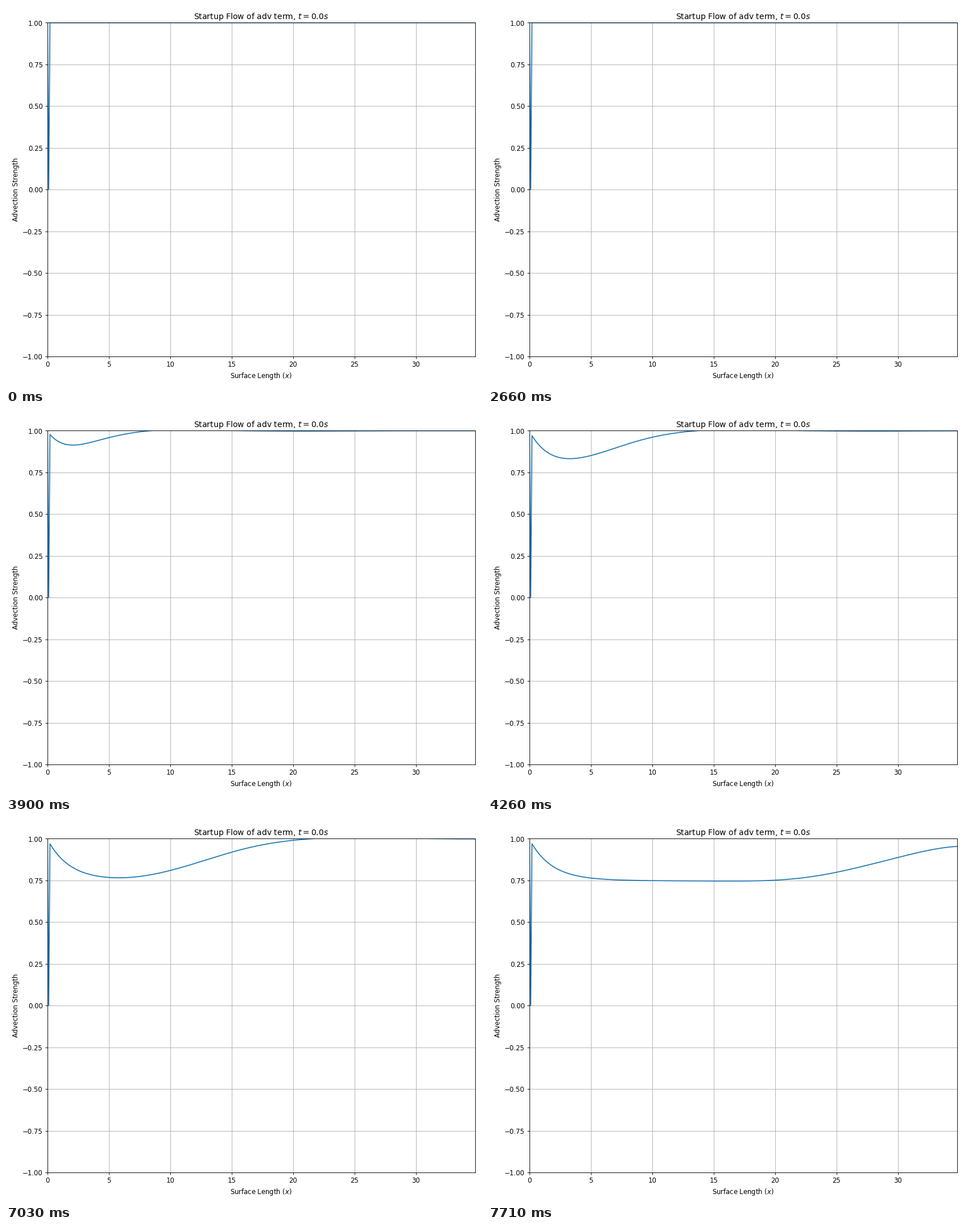
These frames come from a looping animation (837 by 669 pixels, 8000 ms). A matplotlib script:

```python
import math

import numpy as np
import matplotlib.pyplot as plt
from matplotlib.animation import FuncAnimation

DPI = 83.7
W, H = 837, 669
LEFT, RIGHT, TOP, BOTTOM = 73.0, 824.5, 29.5, 617.0
LOOP, TICK = 8000, 20
STEP = 40
LENGTH = 34.8

x = np.linspace(0, LENGTH, 349)
erf = np.vectorize(math.erf)

# Front position, its speed and its width at a few solver steps
KEYS = [0, 21, 32, 49, 58, 67]
POS = [-6.5, -1.2, 2.05, 12.0, 21.8, 29.1]
SPEED = [0.2, 0.25, 0.4, 0.9, 1.0, 0.75]
WIDTH = [1.8, 2.5, 3.2, 4.25, 5.15, 5.4]


def front(n):
    """Cubic Hermite path of the front centre."""
    i = min(np.searchsorted(KEYS, n, side="right") - 1, len(KEYS) - 2)
    h = KEYS[i + 1] - KEYS[i]
    s = (n - KEYS[i]) / h
    return ((1 + 2 * s) * (1 - s) ** 2 * POS[i]
            + s * (1 - s) ** 2 * h * SPEED[i]
            + s * s * (3 - 2 * s) * POS[i + 1]
            + s * s * (s - 1) * h * SPEED[i + 1])


def bump(z, centre, width):
    return np.exp(-((z - centre) / width) ** 2)


def profile(n):
    y = np.ones_like(x)
    if n > 0:
        deficit = 0.2488 + 0.0003 * x - 0.2188 * np.exp(-(x - 0.2) / 1.78)
        near_wall = x - 0.8 * np.exp(x - LENGTH)
        z = (near_wall - front(n)) / np.interp(n, KEYS, WIDTH)
        z = np.where(z < 0, z * (1 + 0.055 * z * z), z)
        ripple = 0.008 * bump(z, 5.8, 1.2) - 0.035 * bump(z, 2.6, 1.1)
        step = 0.5 * (1 - erf(z / math.sqrt(2)))
        y -= deficit * (step + ripple * min(1, n / 32) ** 2)
    y[0], y[1] = 1, 0
    return y


def solver_step(t):
    if t < 2660:
        return 0
    if t < 7030:
        return min(49, 1 + (t - 2660) // STEP)
    return min(67, 50 + (t - 7030) // STEP)


def heading(clock):
    return f"Startup Flow of adv term, $t={clock}s$"


fig, ax = plt.subplots(figsize=((W + 1e-6) / DPI, (H + 1e-6) / DPI), dpi=DPI)
fig.subplots_adjust(left=LEFT / W, right=RIGHT / W,
                    top=1 - TOP / H, bottom=1 - BOTTOM / H)
line, = ax.plot(x, profile(0))
title = ax.set_title(heading("0.0"))
ax.set_xlabel("Surface Length ($x$)")
ax.set_ylabel("Advection Strength")
ax.set_xlim(0, LENGTH)
ax.set_ylim(-1, 1)
ax.grid(True)


def update(frame):
    t = frame * TICK + TICK // 2
    line.set_ydata(profile(solver_step(t)))
    title.set_text(heading("0.01" if 40 <= t < 80 else "0.0"))
    return line, title


anim = FuncAnimation(fig, update, frames=LOOP // TICK, interval=TICK,
                     repeat=True, repeat_delay=0, blit=False)
plt.show()
```
